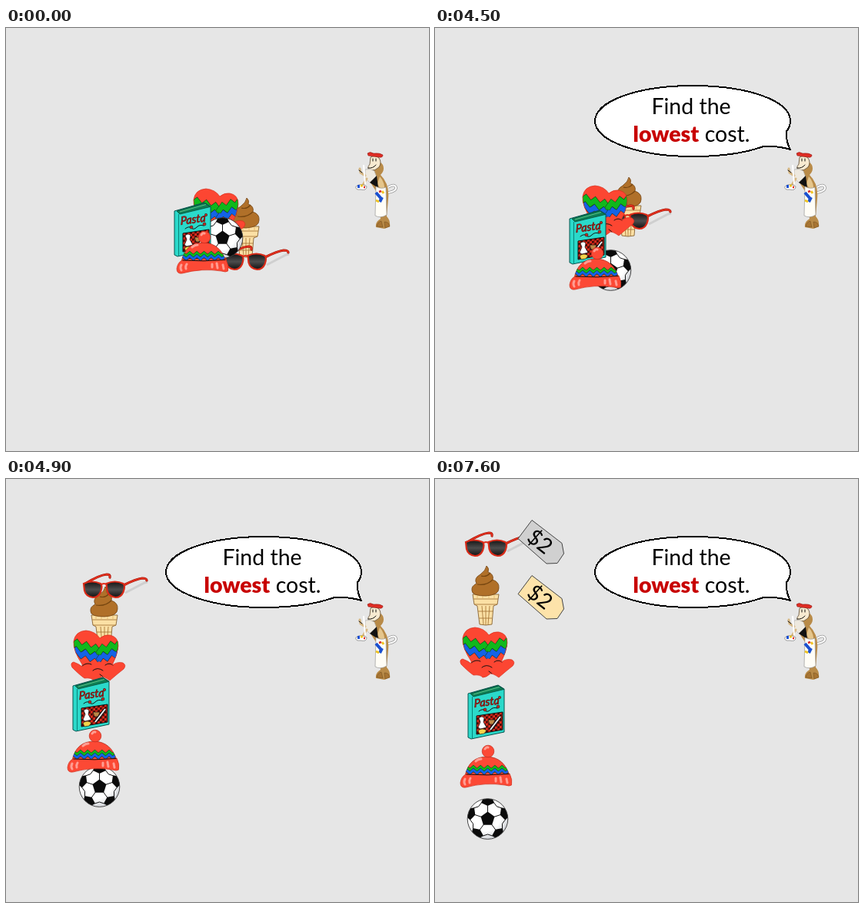
These frames come from a looping animation (550 px wide and 550 px high, 8 s). An HTML page:

```html
<!DOCTYPE html>
<html lang="en">
<head>
<meta charset="utf-8">
<title>Find the lowest cost</title>
<style>
  html, body { margin: 0; width: 100%; height: 100%; overflow: hidden; background: #e6e6e6; }
  svg { display: block; width: 550px; height: 550px; }
  text { font-family: Lato, "Open Sans", sans-serif; }
  .speech { font-size: 28.5px; }
  .price { font-size: 28px; text-anchor: middle; }
  .ink { fill: none; stroke: #111; stroke-width: 1; stroke-linecap: round; stroke-linejoin: round; }
  .shine { fill: none; stroke: #ff9d92; stroke-width: 3; stroke-linecap: round; }
</style>
</head>
<body>
<svg viewBox="0 0 550 550">
  <defs>
    <linearGradient id="lens" x2="0" y2="1">
      <stop offset="0" stop-color="#151515"/><stop offset=".5" stop-color="#4d4d4d"/><stop offset="1" stop-color="#101010"/>
    </linearGradient>
    <radialGradient id="leather" cx=".4" cy=".35" r=".7">
      <stop offset=".65" stop-color="#fff"/><stop offset="1" stop-color="#c9ccd2"/>
    </radialGradient>
    <pattern id="check" width="6" height="6" patternUnits="userSpaceOnUse" patternTransform="skewY(-8)">
      <path d="M0 0H6V6H0Z" fill="#e02b1c"/><path d="M0 0H3V3H0ZM3 3H6V6H3Z" fill="#4a0d08"/>
    </pattern>
    <path id="mitt" d="M47 237Q35 219 36 207Q38 194 52 193Q64 194 70 203Q76 198 83 199Q94 201 94 213Q93 225 86 238Q93 233 100 235Q105 238 101 243Q92 250 83 258Q76 253 72 253Q67 258 62 258Q59 254 50 255Q44 251 34 241Q31 235 36 234Q42 236 47 240Z"/>
    <path id="dome" d="M39 386Q44 361 68 361Q90 362 97 386Z"/>
    <clipPath id="mittClip"><use href="#mitt"/></clipPath>
    <clipPath id="domeClip"><use href="#dome"/></clipPath>
    <clipPath id="ballClip"><circle cx="68.5" cy="442" r="26.3"/></clipPath>
    <path id="tag" d="M126 53.500L165 83.500L167.500 97L159 109.500L145 110L108 77.500Z" stroke="#444"/>
  </defs>

  <g id="mascot">
    <path d="M497 214Q508 212 507 207Q505 202 497 207" fill="none" stroke="#999" stroke-width="3.500"/>
    <path d="M497 214Q508 212 507 207Q505 202 497 207" fill="none" stroke="#fff" stroke-width="2"/>
    <path d="M479 178Q482 168 490 178Q493 185 487 191Q499 203 497 222L495 245Q500 250 499 258L492 261L481 259Q480 252 487 248L481 212L472 198Z" fill="#b98b48"/>
    <path d="M486 193Q493 201 492 211Q487 210 483 203Z" fill="#e5c68c"/>
    <path d="M482 258Q483 252 488 251L490 259ZM493 260L492 252Q498 252 499 258Z" fill="#a87533" stroke="#6d4b1c" stroke-width=".5"/>
    <path d="M474 168Q480 165 485 169Q489 175 485 181Q480 186 474 185Q468 183 473 177Z" fill="#f7ead0" stroke="#5d4930" stroke-width=".8"/>
    <path d="M470 163Q473 160 478 163Q486 162 490 165Q490 169 485 168L471 166Z" fill="#df2d24" stroke="#7c120e" stroke-width=".5"/>
    <path d="M477 170v3M481 170v3M471 182Q477 183 481 178" class="ink"/>
    <path d="M467 184Q474 182 479 186L482 194L473 201L467 195Z" fill="#eee9df" stroke="#aaa" stroke-width=".6"/>
    <path d="M473 201L482 192L484 208Z" fill="#111"/>
    <path d="M481 206Q488 210 494 207L495 243Q487 248 480 244Z" fill="#fffdf6" stroke="#999" stroke-width=".7"/>
    <path d="M467 192L461 188L460 183M469 196L464 204" fill="none" stroke="#d6b783" stroke-width="3" stroke-linecap="round"/>
    <path d="M465 178L467 203" stroke="#fff" stroke-width="2"/>
    <path d="M459 185l4 3" class="ink"/>
    <path d="M455 206Q461 201 469 206Q469 212 461 210Q454 211 455 206Z" fill="#fff" stroke="#777" stroke-width=".7"/>
    <path d="M457 206h3M481 214l7 8M486 226l3-6" stroke="#1b50d0" stroke-width="4"/>
    <path d="M461 205h3M481 224l4 2M489 212l2 3" stroke="#f0c422" stroke-width="3"/>
    <path d="M465 207h2M485 213l3-1" stroke="#dd2c22" stroke-width="2.500"/>
  </g>

  <g id="bubble">
    <path d="M457 134.500Q462 128 462 121C462 94 406 75 335 75C264 75 208 95 208 121C208 147 265 167 335 167C373 167 405 162 427 154Q446 153 462 158Q456 147 457 134.500Z" fill="#fff" stroke="#000" stroke-width="2" stroke-linejoin="round" shape-rendering="crispEdges"/>
    <g id="speech" class="speech">
      <text x="333" y="112" text-anchor="middle">Find the</text>
      <text x="257.500" y="148" font-weight="900" fill="#c80000">lowest</text>
      <text x="409.500" y="148" text-anchor="end">cost.</text>
    </g>
  </g>

  <g id="cone">
    <path d="M49 150H83L81 163L76 165L74 189Q66 191 58 189L55 165L51 163Z" fill="#fbe0a5" stroke="#7a5420" stroke-width=".8"/>
    <path d="M50 156H82M51 163H81M56 172H75M57 181H74M61 165L63 189M66 165V190M71 165L69 189" fill="none" stroke="#a9793a" stroke-width=".9"/>
    <path d="M55 151v4M62 151v4M70 151v4M77 151v4" stroke="#e6bd70"/>
    <path d="M67 113Q71 116 69 121Q77 124 75 131Q84 134 83 142Q83 151 66 152Q48 152 48 145Q47 139 54 136Q50 129 59 124Q66 119 67 113Z" fill="#b07029" stroke="#744513" stroke-width=".8"/>
    <path d="M60 126Q67 128 72 122M55 137Q67 139 75 131" fill="none" stroke="#754510" stroke-width="1.200"/>
  </g>

  <g id="glasses">
    <path d="M94 94L119 81L123 80" fill="none" stroke="#cfcfcf" stroke-width="3"/>
    <path id="arms" d="M42 82Q60 71 70 70Q75 70 74 74M92 84Q108 76 116 75Q122 75 122 78" fill="none" stroke="#9c1208" stroke-width="3.200" stroke-linecap="round"/>
    <path d="M42 82Q60 71 70 70Q75 70 74 74M92 84Q108 76 116 75Q122 75 122 78M62 84Q66 80 71 84" fill="none" stroke="#e2301d" stroke-width="2" stroke-linecap="round"/>
    <g fill="url(#lens)" stroke="#d92a18" stroke-width="2.200">
      <path id="rim" d="M40 82Q51 77 62 82Q65 85 62 93Q59 100 52 100Q43 99 41 91Z"/>
      <use href="#rim" x="29.500"/>
    </g>
  </g>

  <g id="mittens">
    <use href="#mitt" fill="#fc4632"/>
    <g id="mittBands" clip-path="url(#mittClip)"></g>
    <path d="M47 239Q53 234 59 237M87 238Q82 234 77 238M61 245Q67 240 74 245M70 250l4 3" class="ink"/>
    <use href="#mitt" fill="none" stroke="#d8301f" stroke-width=".7"/>
  </g>

  <g id="ball"></g>

  <g id="book">
    <path d="M43 279L82 268L90 273V329L47 338L43 336Z" fill="#2bd9ca" stroke="#07554f"/>
    <path d="M46 279L82 268.500L89.500 273.500L50 283Z" fill="#0d7f55" stroke="#063d2b" stroke-width=".7"/>
    <path d="M50 280L84 270.500" stroke="#5fc389" stroke-width="1"/>
    <path d="M48.500 283V337" stroke="#07837a"/>
    <text transform="translate(51 297) rotate(-8) skewX(-6)" font-size="14.500" font-style="italic" fill="#d01f18" stroke="#6b0f0b" stroke-width=".7">Pasta</text>
    <path d="M57 302q5-4 8-1t7-1 9-2" class="ink"/>
    <g fill="#c8281c" stroke="#222" stroke-width=".6"><circle cx="65" cy="300" r="2"/><circle cx="82" cy="296" r="2"/><circle cx="84" cy="284" r="1.700"/></g>
    <path d="M54 308L88 303V326L54 332Z" fill="url(#check)" stroke="#111"/>
    <path d="M57 311q4-4 7 0l-1 5 4 7-8 2-3-2 3-7Z" fill="#fff" stroke="#111" stroke-width=".7"/>
    <path d="M56 327q6-4 11 0l-3 4-6 1Z" fill="#f4d34a" stroke="#111" stroke-width=".6"/>
    <path d="M69 313h9l-2 6h-5Z" fill="#bd8745" stroke="#111" stroke-width=".7"/>
    <path d="M72 326L85 309" stroke="#111" stroke-width="4"/><path d="M72 326L85 309" stroke="#eee" stroke-width="2"/>
  </g>

  <g id="hat">
    <use href="#dome" fill="#fc4935" stroke="#a72518" stroke-width=".7"/>
    <g id="hatBands" clip-path="url(#domeClip)"></g>
    <path d="M40 384Q68 386 97 383Q101 391 99.500 398Q97 400 91 398Q65 394 40 401Q33 402 33 395Q34 387 40 384Z" fill="#fc4935" stroke="#d0301f" stroke-width=".7"/>
    <path d="M41 384Q68 386 96 383.500" class="ink"/>
    <circle cx="69" cy="354" r="7.800" fill="#fc4935" stroke="#c52c1d" stroke-width=".7"/>
    <path d="M65 351q2-3 4-2M53 367q3-3 7-3M39 390q-2 4 0 7M46 389q-2 3-1 6M79 389v4M85 388l1 6M93 390l1 5" class="shine"/>
  </g>

  <g id="tagA"><use href="#tag" fill="#d0d0d0"/><text class="price" transform="translate(130.500 89) rotate(38)">$2</text></g>
  <g id="tagB"><use href="#tag" y="72" fill="#fde3aa"/><text class="price" transform="translate(130.500 161) rotate(38)">$2</text></g>
</svg>
<script>
const LOOP = 8000;
const $ = id => document.getElementById(id);

// Offsets of the pile from the finished column.
const pile = {
  glasses: [245, 214], cone: [246, 108], mittens: [208, 16],
  book: [176, -41], hat: [189, -82], ball: [213, -169]
};
const moves = [4500, 4700, 4900, 5100];
const appear = { bubble: 500, speech: 2500, tagA: 7100, tagB: 7600 };

function zigzag(x0, y0, x1, y1, n, amp) {
  let d = "";
  for (let i = 0; i <= n; i++) {
    const x = x0 + (x1 - x0) * i / n;
    const y = y0 + (y1 - y0) * i / n + (i % 2 ? -amp : amp);
    d += (i ? "L" : "M") + x.toFixed(1) + " " + y.toFixed(1);
  }
  return d;
}

function band(d, color, w) {
  return `<path d="${d}" fill="none" stroke="#17301c" stroke-width="${w + 1}"/>` +
         `<path d="${d}" fill="none" stroke="${color}" stroke-width="${w}"/>`;
}

const green = "#10b81c", blue = "#1463e6";
$("mittBands").innerHTML =
  band(zigzag(34, 219, 70, 229, 6, 3), blue, 6.5) +
  band(zigzag(34, 210, 70, 220, 6, 3), green, 6.5) +
  band(zigzag(68, 229, 96, 220, 5, 3), blue, 6.5) +
  band(zigzag(68, 220, 96, 211, 5, 3), green, 6.5);
$("hatBands").innerHTML =
  band(zigzag(36, 380, 101, 380, 14, 2), blue, 3.5) +
  band(zigzag(36, 376, 101, 376, 14, 2), green, 2.5);

function drawBall() {
  const cx = 68.5, cy = 442, turn = Math.PI * 2 / 5;
  const at = (r, a) => [cx + r * Math.cos(a), cy + r * Math.sin(a)].map(v => v.toFixed(1));
  const corners = [0, 1, 2, 3, 4];
  const patch = points => `<path d="M${points.join("L")}Z" fill="#0b0b0b"/>`;
  // Outer patches are squeezed towards the rim.
  const rimPatch = a => patch(corners.map(i => {
    const out = 23 - 6 * Math.cos(i * turn), side = 9 * Math.sin(i * turn);
    return at(Math.hypot(out, side), a + Math.atan2(side, out));
  }));
  let patches = patch(corners.map(i => at(9.5, i * turn - Math.PI / 2))), seams = "";
  for (const i of corners) {
    const a = i * turn - Math.PI / 2, mid = a + turn / 2;
    patches += rimPatch(a);
    seams += `M${at(9, a)}L${at(17, a)}M${at(22.5, a + .38)}L${at(20, mid)}L${at(22.5, a + turn - .38)}`;
  }
  $("ball").innerHTML = `<circle cx="${cx}" cy="${cy}" r="26.3" fill="url(#leather)"/>` +
    `<g clip-path="url(#ballClip)">${patches}<path d="${seams}" class="ink"/></g>` +
    `<circle cx="${cx}" cy="${cy}" r="26.3" fill="none" stroke="#333" stroke-width=".9"/>`;
}
drawBall();

function draw(t) {
  const left = 1 - moves.filter(m => t >= m).length / moves.length;
  for (const id in pile) {
    const [x, y] = pile[id].map(v => Math.round(v * left));
    $(id).setAttribute("transform", `translate(${x} ${y})`);
  }
  for (const id in appear) $(id).style.display = t >= appear[id] ? "" : "none";
}

const start = performance.now();
function tick() {
  draw((performance.now() - start) % LOOP);
  requestAnimationFrame(tick);
}
draw(0);
requestAnimationFrame(tick);
</script>
</body>
</html>
```
